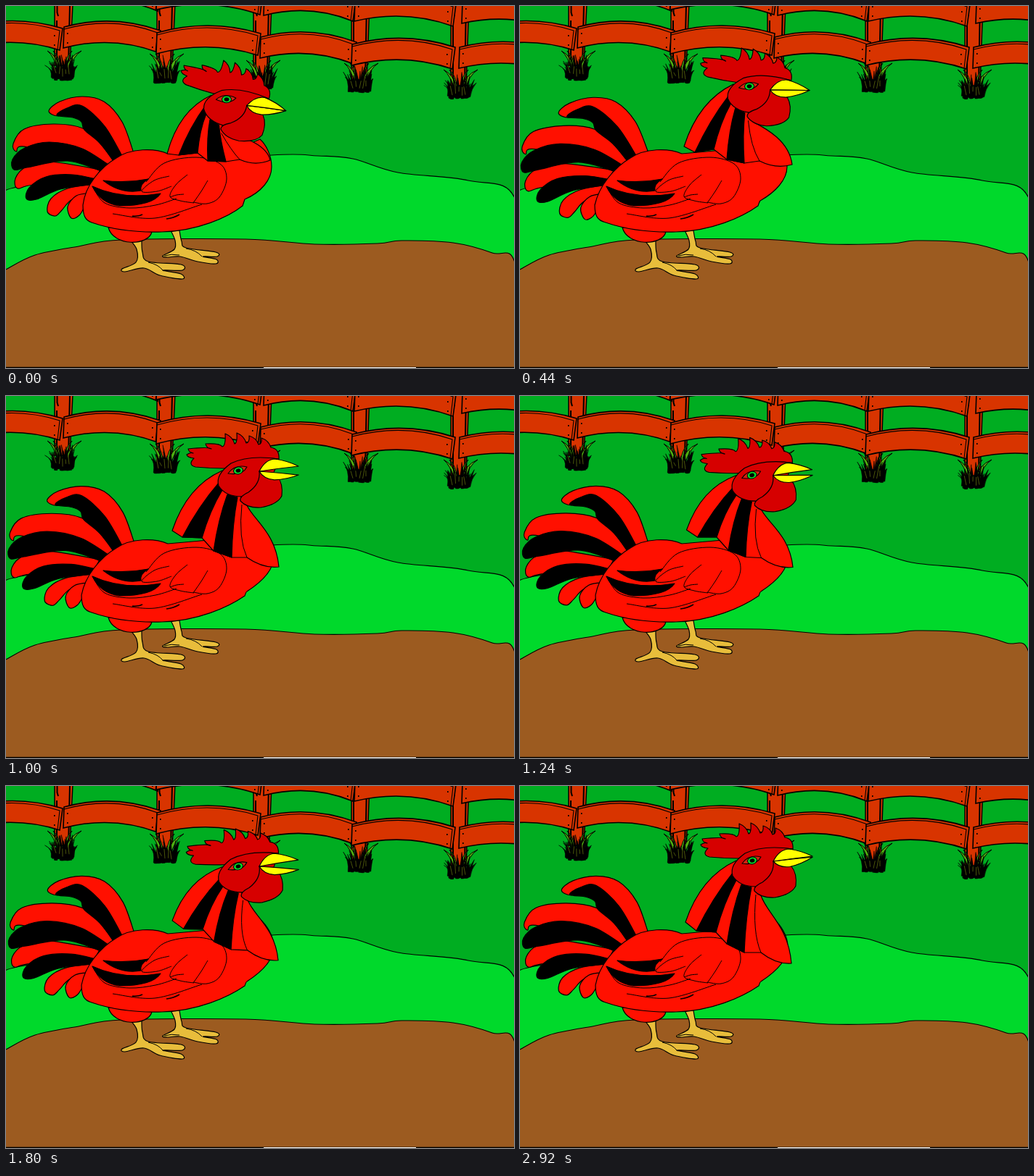
An HTML page with a canvas for the animation above (3 s loop, 700 px wide and 500 px high).

```html
<!DOCTYPE html>
<html lang="en">
<head>
<meta charset="utf-8">
<title>Rooster</title>
<style>
html, body { margin: 0; width: 100%; height: 100%; overflow: hidden; background: #00ad21; }
canvas { display: block; }
</style>
</head>
<body>
<canvas id="stage" width="700" height="500"></canvas>
<script>
const LOOP = 3000;
const RED = '#ff1000', COMB = '#d60000', WOOD = '#d83400', LEG = '#e8bd3b', YELLOW = '#ffff00';
const view = document.getElementById('stage').getContext('2d');
const back = document.createElement('canvas');
back.width = 700;
back.height = 500;

function shape(c, d, fill, width = 1.2) {
  const p = typeof d === 'string' ? new Path2D(d) : d;
  if (fill) { c.fillStyle = fill; c.fill(p); }
  if (width) { c.strokeStyle = '#000'; c.lineWidth = width; c.stroke(p); }
}

// smooth path through "x y x y ..."
function spline(text, close) {
  const v = text.split(' ').map(Number), n = v.length / 2;
  const pt = i => { i = Math.max(0, Math.min(n - 1, i)); return [v[2 * i], v[2 * i + 1]]; };
  const path = new Path2D();
  path.moveTo(...pt(0));
  for (let i = 0; i < n - 1; i++) {
    const a = pt(i - 1), b = pt(i), e = pt(i + 1), f = pt(i + 2);
    path.bezierCurveTo(b[0] + (e[0] - a[0]) / 6, b[1] + (e[1] - a[1]) / 6,
      e[0] - (f[0] - b[0]) / 6, e[1] - (f[1] - b[1]) / 6, ...e);
  }
  if (close) path.closePath();
  return path;
}

// ---- scenery ----
function plank(c, x0, y0, x1, y1) {
  const mx = (x0 + x1) / 2, my = (y0 + y1) / 2 - 21, h = 29;
  shape(c, `M${x0} ${y0}Q${mx} ${my} ${x1} ${y1}L${x1 - 4} ${y1 + h + 1}Q${mx} ${my + h + 1} ${x0 - 1} ${y0 + h}Z`, WOOD, 1.6);
  shape(c, `M${x0} ${y0 + 3}Q${mx} ${my + 3} ${x1 - 4} ${y1 + 3}L${x1 - 7} ${y1 + h}`, null, 1.1);
  c.fillStyle = '#000';
  for (const dy of [8, 21]) {
    c.fillRect(x0 + 4, y0 + dy, 1.6, 2);
    c.fillRect(x1 - 12, y1 + dy + 1, 1.6, 2);
  }
}

function post(c, x, bottom) {
  shape(c, `M${x} -2V${bottom}H${x + 21}L${x + 25} -2Z`, WOOD, 1.5);
  shape(c, `M${x + 3.5} -2V9L${x + 5} 14M${x + 3} 20V${bottom}M${x + 21} -2L${x + 19} ${bottom}`, null, 2);
}

function tuft(c, x, y, rnd) {
  for (const dx of [-21, 26, -13, 13])
    shape(c, `M${x + dx * .3} ${y - 12}Q${x + dx * .55} ${y - 34} ${x + dx} ${y - 41}Q${x + dx * .3} ${y - 34} ${x + dx * .1} ${y - 12}Z`, '#4fae10', 1);
  for (let i = 0; i < 34; i++) {
    const u = i / 33 * 2 - 1;
    const bx = x + u * 14, tx = x + u * 20 + (rnd() - .5) * 9;
    const ty = y - 18 - rnd() * 22 * (1 - Math.abs(u) * .4);
    const by = y - rnd() * 5;
    shape(c, `M${bx - 1.8} ${by}Q${bx} ${y - 16} ${tx} ${ty}Q${bx + 3} ${y - 14} ${bx + 1.8} ${by}Z`, '#000', .5);
  }
  c.strokeStyle = '#6b7a10';
  c.lineWidth = .7;
  for (let i = 0; i < 5; i++) {
    const bx = x - 9 + i * 4.5;
    c.beginPath();
    c.moveTo(bx, y - 5 - rnd() * 6);
    c.lineTo(bx + (rnd() - .5) * 7, y - 14 - rnd() * 10);
    c.stroke();
  }
}

function scenery(c) {
  let seed = 17;
  const rnd = () => (seed = seed * 16807 % 2147483647) / 2147483647;
  c.fillStyle = '#00ad21';
  c.fillRect(0, 0, 700, 500);
  [[67, 82], [208, 86], [341, 97], [476, 102], [613, 110]].forEach(p => post(c, ...p));
  const upper = [[80, -33, 213, -23], [208, -24, 354, -18], [356, -16, 482, -9], [481, -8, 620, -2], [629, -5, 765, 4]];
  const lower = [[80, 29, 213, 34], [-60, 31, 78, 31], [208, 37, 351, 38], [351, 43, 483, 50], [477, 53, 619, 57], [625, 57, 765, 63]];
  [...upper, ...lower].forEach(p => plank(c, ...p));
  [[78, 103], [219, 107], [352, 116], [487, 120], [624, 129]].forEach(p => tuft(c, ...p, rnd));

  shape(c, spline('-2 256 20 249 160 224 366 206 430 207 478 211 540 230 637 241 702 268 702 420 -2 420', true), '#00d92b', 1.1);
  shape(c, spline('-2 365 40 344 100 332 160 323 330 322 425 329 512 328 545 324 616 327 670 341 702 358 710 510 -9 510', true), '#9c5b20', 1.1);
  c.fillStyle = '#000';
  c.fillRect(0, 498.6, 700, 1.4);
  c.fillStyle = '#fff';
  c.fillRect(355, 499, 210, 1);
}

// ---- timing: each key is [time, ...values] ----
function at(keys, t) {
  let i = 0;
  while (i < keys.length - 2 && t >= keys[i + 1][0]) i++;
  const [ta, ...a] = keys[i], [tb, ...b] = keys[i + 1];
  const k = Math.min(1, Math.max(0, (t - ta) / (tb - ta)));
  return a.map((v, j) => v + (b[j] - v) * k);
}

// eye x, eye y, tilt
const HEAD = [
  [0, 304, 129, 15], [440, 316, 111, 8], [560, 319, 105, 4], [1000, 320, 103, 0],
  [1100, 320, 103, 0], [1480, 319, 120, -3], [1800, 320, 111, -2], [2160, 320, 103, 0]
];
const JAW = [[440, 0], [560, 3], [1000, 12.7], [1100, 13], [1480, 0], [1760, 14.5], [1800, 14], [2200, 9.6], [2480, 16], [2960, 0]];
// stretch, tilt
const TAIL = [[0, 1, 0], [440, 1.045, -1.5], [520, 1.047, -1.6], [1000, 1.034, .5], [1120, 1.03, .8]];
// rump x, chest x
const BODY = [[0, 106, 366], [440, 103, 368], [1000, 104, 369]];
// lower hem, from nape to chest
const HEM = [
  [0, 222, 204, 238, 206, 264, 203, 278, 214, 303, 215, 322, 212, 364, 213],
  [440, 226, 194, 241, 202, 267, 198, 285, 212, 309, 217, 330, 214, 375, 219],
  [1000, 229, 186, 243, 195, 270, 196, 286, 214, 311, 223, 332, 223, 376, 236],
  [1480, 230, 184, 246, 195, 272, 194, 288, 212, 311, 222, 333, 224, 376, 237],
  [2160, 228, 188, 243, 200, 270, 202, 285, 218, 309, 230, 332, 230, 374, 245]
];

// ---- rooster ----
const plume = s => spline(s, true);
const RED_PLUMES = [
  '176 203 160 160 135 132 105 125 74 132 59 145 72 152 95 145 110 168 150 217',
  '152 219 130 190 106 169 65 163 25 170 10 190 14 201 30 195 140 228',
  '130 226 60 215 28 222 13 238 16 252 38 247 122 242',
  '122 246 85 252 62 266 57 284 68 290 77 282 90 268 116 258',
  '118 258 97 262 85 277 90 293 101 289 110 274'
].map(plume);
const BLACK_PLUMES = [
  '161 209 136 166 105 138 84 141 70 151 92 154 104 160 108 171 130 190 150 217',
  '148 224 105 197 60 188 26 196 9 212 11 226 29 223 85 214 136 230',
  '128 240 92 233 55 236 32 251 28 266 42 267 75 253 122 246'
].map(plume);

const LEGS = [
  '227 310 233 324 232 336 216 345 222 347 240 346 264 353 289 356 290 350 271 346 291 346 289 340 248 334 242 325 239 310',
  '170 322 180 336 179 354 160 363 164 367 190 362 212 372 243 377 241 370 216 365 243 365 241 357 196 353 188 340 187 322'
].map(plume);
const TOES = 'M218 345Q228 342 239 344M248 335Q262 337 270 346M196 354Q210 357 216 365';
const WING_DARK = [
  'M134 241Q165 245 196 239Q184 246 186 255Q158 260 134 241Z',
  'M119 249Q160 268 213 259Q202 276 156 276Q130 272 119 249Z'
];
const WING_LINES = [
  '193 243 218 217 262 209 295 218 304 239 294 264 277 273 258 271',
  '225 235 204 241 187 256 208 256 228 249',
  '250 233 234 247 226 263 240 269 259 272',
  '226 264 235 261 245 260',
  '278 241 269 256 258 272',
  '119 249 136 272 170 279 206 275 235 266',
  '147 287 205 293 270 274'
].map(s => spline(s));
const WING_MARKS = 'M174 290Q182 291 188 288M221 294Q231 293 239 288';

// comb spikes: tip, then the notch behind it
const SPIKES = [
  [32, -45, 28, -36], [15, -48, 11, -38], [-2, -52, -5, -37], [-18, -51, -22, -33],
  [-45, -37, -37, -30], [-69, -30, -62, -24], [-71, -22, -61, -17]
];
function combPath() {
  let d = 'M56 -16Q57 -30 45 -32', x = 45, y = -32;
  for (const [tx, ty, nx, ny] of SPIKES) {
    d += `Q${x - 3} ${(y + ty) / 2 - 3} ${tx} ${ty}Q${tx + 1} ${ny - 1} ${nx} ${ny}`;
    [x, y] = [nx, ny];
  }
  return new Path2D(d + 'Q-70 -8 -59 -5Q-38 -3 -18 -3Q16 -21 56 -16Z');
}
const CREST = combPath();
const FACE = new Path2D('M56 -16Q15 -22 -10 -10Q-32 6 -27 21Q-18 36 6 36L25 36L48 5L52 -5Z');
const WATTLE = new Path2D('M29 1Q31 18 14 30Q1 36 3 42Q12 52 31 51Q54 47 60 35Q62 18 54 8Z');
const EYE = new Path2D('M-14 4Q-5 -9 12 -5Q6 7 -14 4Z');
const UPPER = new Path2D('M29 1Q37 -15 50 -16Q67 -14 83 -6Q56 -3 29 1Z');
const LOWER = new Path2D('M29 1Q37 10 52 8Q68 4 83 -6Q56 -3 29 1Z');

function drawTail(c, t) {
  const [stretch, tilt] = at(TAIL, t);
  c.save();
  c.translate(150, 215);
  c.rotate(tilt * Math.PI / 180);
  c.scale(stretch, 1);
  c.translate(-150, -215);
  RED_PLUMES.forEach(p => shape(c, p, RED));
  BLACK_PLUMES.forEach(p => shape(c, p, '#000'));
  c.restore();
}

function drawBody(c, t) {
  const [l, r] = at(BODY, t), d = r - 366;
  LEGS.forEach(p => shape(c, p, LEG));
  shape(c, TOES, null, 1);
  shape(c, 'M141 306C148 332 196 332 201 312Z', RED);
  shape(c, `M223 204C205 196 172 196 152 210C130 223 109 248 ${l} 275C${l} 289 ${l + 3} 296 118 299C150 310 182 313 215 312C263 311 306 292 ${326 + d} 276Q${328 + d} 270 ${329 + d} ${267 + d}C352 257 ${r} 240 ${r} 222C${r} 206 358 191 350 184L325 195Z`, RED);
  WING_DARK.forEach(p => shape(c, p, '#000'));
  WING_LINES.forEach(p => shape(c, p, null, 1));
  shape(c, WING_MARKS, null, 1.6);
}

function drawNeck(c, hem, spot) {
  const [nape, a, b, e, f, g, chest] = hem.reduce((o, v, i) => (i % 2 ? o[o.length - 1].push(v) : o.push([v]), o), []);
  const mid = (p, q, dx, dy) => [(p[0] + q[0]) / 2 + dx, (p[1] + q[1]) / 2 + dy];
  const band = (p, q, lo, hi) => shape(c, `M${p}Q${mid(p, lo, -3, -5)} ${lo}L${hi}Q${mid(q, hi, -3, -5)} ${q}Z`, '#000');
  const top = spot(-22, 0), throat = spot(12, 48), seam = spot(5, 47);
  const h = chest[1] - throat[1];
  shape(c, `M${nape}Q${mid(nape, top, -14, -20)} ${top}L${throat}C${chest[0] - 35} ${throat[1] + h * .4 - 14} ${chest[0] - 4} ${chest[1] - h * .55} ${chest}`
    + `Q${mid(chest, g, 0, 9)} ${g}L${f}L${e}L${b}L${a}Z`, RED);
  band(spot(-26, 16), spot(-22, 27), a, b);
  band(spot(-15, 33), spot(-1, 37), e, f);
  shape(c, `M${seam}Q${g[0] - 12} ${g[1] - (g[1] - seam[1]) * .35} ${g}`, null, 1);
}

function ellipse(c, rx, ry, color) {
  c.beginPath();
  c.ellipse(0, 0, rx, ry, -.25, 0, 7);
  c.fillStyle = color;
  c.fill();
}

function drawHead(c, x, y, a, jaw) {
  c.save();
  c.translate(x, y);
  c.rotate(a);
  [CREST, FACE, WATTLE].forEach(p => shape(c, p, COMB));
  shape(c, EYE, '#d62010', 1.1);
  ellipse(c, 7, 5.3, '#000');
  ellipse(c, 6, 4.4, '#00d92b');
  ellipse(c, 3.4, 2.7, '#000');
  c.save();
  c.translate(29, 1);
  c.rotate(jaw * Math.PI / 180);
  c.translate(-29, -1);
  shape(c, LOWER, YELLOW);
  c.restore();
  shape(c, UPPER, YELLOW);
  c.restore();
}

function draw(t) {
  const c = view;
  const [x, y, deg] = at(HEAD, t), a = deg * Math.PI / 180;
  const cos = Math.cos(a), sin = Math.sin(a);
  const spot = (u, v) => [x + u * cos - v * sin, y + u * sin + v * cos];
  c.lineJoin = 'round';
  c.drawImage(back, 0, 0);
  drawTail(c, t);
  drawBody(c, t);
  drawNeck(c, at(HEM, t), spot);
  drawHead(c, x, y, a, at(JAW, t)[0]);
}

scenery(back.getContext('2d'));
const start = performance.now();
function tick() {
  draw((performance.now() - start) % LOOP);
  requestAnimationFrame(tick);
}
tick();
</script>
</body>
</html>
```
